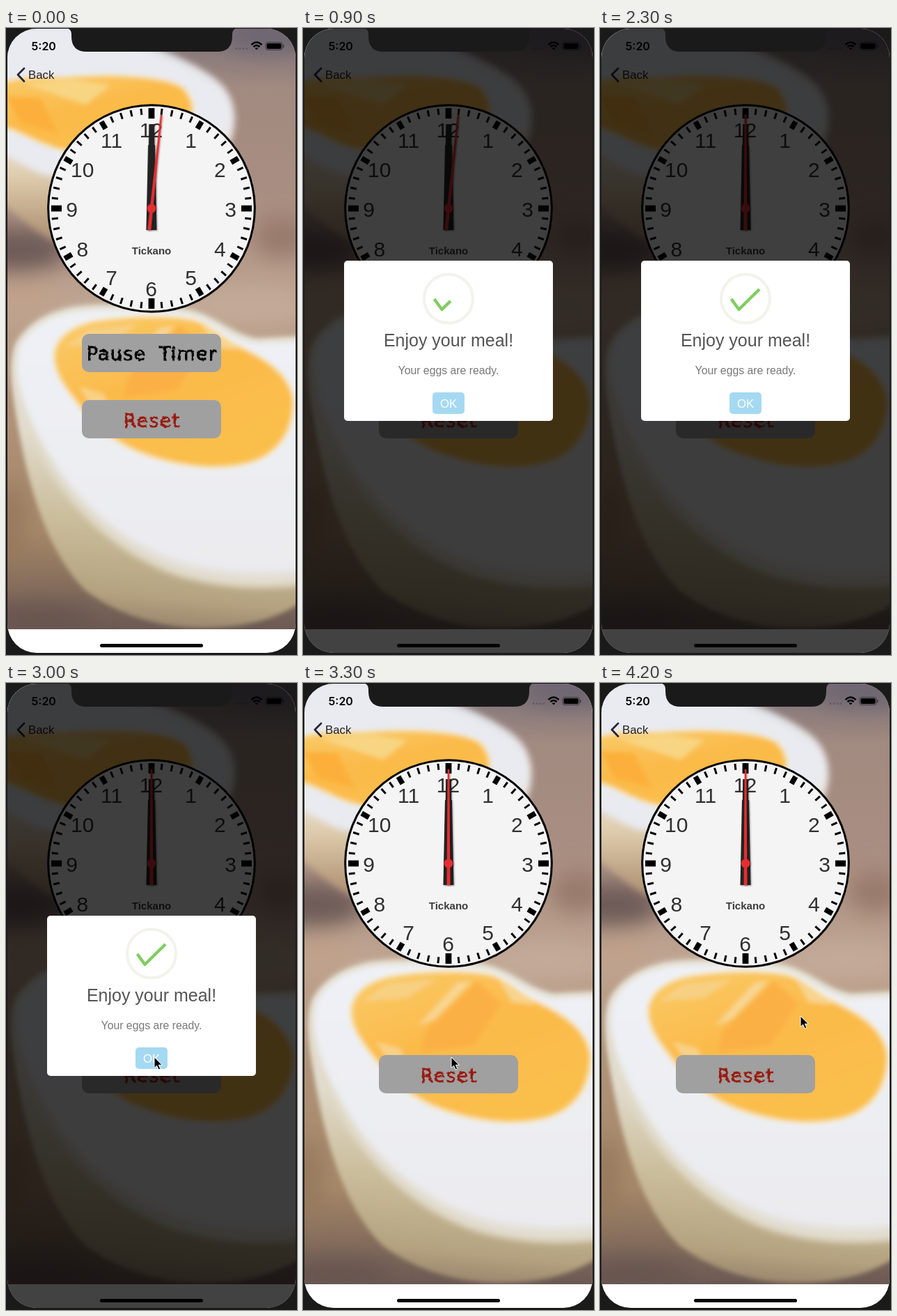
Recreate the animation shown at these times as an HTML page. Size 418 px wide and 900 px high, loop 4.3 s.

```html
<!DOCTYPE html>
<html lang="en">
<head>
<meta charset="utf-8">
<title>Egg timer</title>
<style>
  html, body { margin: 0; width: 100%; height: 100%; overflow: hidden; background: #1b1a1b; }
  svg { display: block; width: 418px; height: 900px; }
  text { font-family: "Liberation Sans", Arial, sans-serif; }
  .mid { text-anchor: middle; }
  .chalk { font: 27px "DejaVu Sans", sans-serif; letter-spacing: 1.2px; word-spacing: 9px; stroke-width: .8; filter: url(#rough); }
</style>
</head>
<body>
<svg viewBox="0 0 418 900">
  <defs>
    <clipPath id="screen"><rect x="2" y="1" width="414" height="896" rx="42"/></clipPath>
    <clipPath id="photoBox"><rect width="418" height="863"/></clipPath>
    <filter id="b3" x="-20%" y="-20%" width="140%" height="140%"><feGaussianBlur stdDeviation="3"/></filter>
    <filter id="b5" x="-30%" y="-30%" width="160%" height="160%"><feGaussianBlur stdDeviation="5"/></filter>
    <filter id="b16" x="-60%" y="-60%" width="220%" height="220%"><feGaussianBlur stdDeviation="16"/></filter>
    <filter id="rough">
      <feTurbulence type="fractalNoise" baseFrequency=".22" numOctaves="2" seed="4"/>
      <feDisplacementMap in="SourceGraphic" scale="3.5" xChannelSelector="R" yChannelSelector="G"/>
    </filter>
    <filter id="drop" x="-100%" y="-20%" width="300%" height="140%">
      <feDropShadow dx="1" dy="1" stdDeviation="1" flood-opacity=".4"/>
    </filter>
    <linearGradient id="wood" x1="0" y1="0" x2="0" y2="1">
      <stop offset="0" stop-color="#7b7078"/>
      <stop offset=".1" stop-color="#a18a80"/>
      <stop offset=".3" stop-color="#aa8f82"/>
      <stop offset=".46" stop-color="#bfa491"/>
      <stop offset=".6" stop-color="#b0947c"/>
      <stop offset=".84" stop-color="#a58768"/>
      <stop offset="1" stop-color="#6b5953"/>
    </linearGradient>
    <linearGradient id="topEgg" x1="0" y1="0" x2="0" y2="1">
      <stop offset="0" stop-color="#dcdee7"/>
      <stop offset=".5" stop-color="#eceae8"/>
      <stop offset=".7" stop-color="#dfccae"/>
      <stop offset="1" stop-color="#a98a6b"/>
    </linearGradient>
    <linearGradient id="side" x1=".3" y1=".4" x2=".25" y2="1">
      <stop offset="0" stop-color="#e2dccd"/>
      <stop offset=".45" stop-color="#cabd9b"/>
      <stop offset=".8" stop-color="#b5a380"/>
      <stop offset="1" stop-color="#937e69"/>
    </linearGradient>
    <linearGradient id="white" x1="0" y1="0" x2="0" y2="1">
      <stop offset="0" stop-color="#eff1f6"/>
      <stop offset="1" stop-color="#ebebef"/>
    </linearGradient>
    <linearGradient id="yolk" x1="0" y1="0" x2=".6" y2="1">
      <stop offset="0" stop-color="#f9cb68"/>
      <stop offset=".5" stop-color="#fbba4a"/>
      <stop offset="1" stop-color="#fabf4c"/>
    </linearGradient>
  </defs>

  <rect width="418" height="900" fill="#1b1a1b"/>
  <g clip-path="url(#screen)">
    <rect width="418" height="900" fill="#fff"/>
    <g clip-path="url(#photoBox)">
      <rect width="418" height="863" fill="url(#wood)"/>
      <g filter="url(#b16)">
        <ellipse cx="15" cy="318" rx="75" ry="34" fill="#6e5b59"/>
        <ellipse cx="380" cy="12" rx="70" ry="22" fill="#6c6570"/>
        <ellipse cx="395" cy="300" rx="40" ry="30" fill="#97796c"/>
        <ellipse cx="350" cy="400" rx="80" ry="24" fill="#c4ab99"/>
        <ellipse cx="30" cy="385" rx="45" ry="22" fill="#bfa18a"/>
        <ellipse cx="50" cy="850" rx="80" ry="22" fill="#685550"/>
        <ellipse cx="8" cy="710" rx="16" ry="60" fill="#93765a"/>
      </g>
      <g filter="url(#b5)">
        <path d="M-20-20H90C170 12 250 36 294 68C340 98 336 150 305 200C250 270 150 330 70 306C40 292 15 262-20 246Z" fill="url(#topEgg)"/>
        <path d="M-20 0H100C180 28 255 48 302 86C335 115 325 150 280 175L60 212C30 202 10 186-20 172Z" fill="#e9ebf1"/>
      </g>
      <g filter="url(#b3)">
        <path id="topYolk" d="M-10 80C30 66 60 74 100 70C160 66 230 70 254 86C280 112 268 150 230 165C170 182 100 184 62 169C35 160 20 147-10 140Z" fill="url(#yolk)" stroke="#f7dca0" stroke-width="4"/>
        <path d="M25 80L95 74L150 82L115 110Z" fill="#f8d582"/>
        <path d="M0 98L50 100L75 152L20 136Z" fill="#fcb03a"/>
      </g>
      <path filter="url(#b3)" d="M85 407C110 398 220 399 260 407C300 416 320 440 360 449L430 445V820C390 850 340 861 280 861C215 861 155 838 115 808C72 766 46 700 28 625C12 550 2 490 16 455C30 428 60 414 85 407Z" fill="url(#side)"/>
      <path filter="url(#b5)" d="M85 409C110 400 222 401 260 409C300 418 320 445 360 452L440 448V792C360 804 290 796 235 776C165 748 98 690 58 618C25 560 5 495 20 455C35 430 60 415 85 409Z" fill="#e4e0d8" stroke="#e0dac9" stroke-width="12"/>
      <path filter="url(#b5)" d="M85 410C110 400 222 402 260 410C300 419 320 446 360 452L440 448V776C360 786 290 780 240 762C165 734 100 680 58 605C25 550 6 492 20 455C35 430 60 415 85 410Z" fill="url(#white)"/>
      <g filter="url(#b3)">
        <path d="M70 464C76 438 105 422 150 418C195 413 250 413 275 421C296 430 305 442 330 455C372 474 408 496 413 535C413 580 390 612 350 624C300 637 245 628 200 612C150 594 118 560 100 535C82 512 66 490 70 464Z" fill="url(#yolk)" stroke="#f8dfa8" stroke-width="4"/>
        <path d="M165 492L222 430L242 428L190 482Z" fill="#f8d591"/>
        <path d="M85 457L120 432L190 425L150 452Z" fill="#f8d083"/>
        <path d="M175 500L250 427L285 460L245 520L170 530Z" fill="#fbb044"/>
        <path d="M280 424L300 436L335 462L300 458Z" fill="#f8d48e"/>
        <path d="M105 515L140 525L160 575L130 555Z" fill="#f9d286"/>
      </g>
    </g>

    <path d="M17 67L26 58M17 67L26 76.500" stroke="#26263c" stroke-width="2.800" stroke-linecap="round"/>
    <text x="32" y="73" font-size="16.800" fill="#20202f">Back</text>
    <text x="36.500" y="31.500" style="font:600 16px Inter,sans-serif">5:20</text>
    <g fill="#625c66">
      <circle cx="331" cy="29.500" r="1.500"/><circle cx="336" cy="29.500" r="1.500"/>
      <circle cx="341" cy="29.500" r="1.500"/><circle cx="346" cy="29.500" r="1.500"/>
    </g>
    <g fill="none" stroke="#000" stroke-width="2.400">
      <path d="M352.500 24Q360 17 367.500 24M355.500 27Q360 23 364.500 27"/>
      <path d="M358 29L360 31L362 29Z" fill="#000" stroke-width="1"/>
    </g>
    <rect x="373" y="20.500" width="24" height="11" rx="3" fill="none" stroke="#3a363c"/>
    <rect x="374.500" y="22" width="21" height="8" rx="1.800"/>
    <path d="M398.500 24V28" stroke="#3a363c" stroke-width="1.500"/>

    <g id="clock" transform="translate(209 259)">
      <circle r="148.300" fill="#f4f4f4" stroke="#000" stroke-width="3"/>
      <g id="dial"></g>
      <text class="mid" y="66" font-size="15" font-weight="700" fill="#3b3b3b">Tickano</text>
      <g id="hands" fill="#222" filter="url(#drop)">
        <path d="M-5-91H5L7.500 31H-7.500Z"/>
        <path d="M-3.800-121H3.800L6 31H-6Z"/>
      </g>
      <g id="second" fill="#e32d31" filter="url(#drop)">
        <path d="M-1.300-135H1.300L2.500 31H-2.500Z"/>
        <circle r="6.500"/>
      </g>
    </g>

    <g id="pause">
      <rect x="109" y="439" width="200" height="55" rx="10" fill="#a0a0a0"/>
      <text class="mid chalk" x="209.500" y="477" stroke="#000">Pause Timer</text>
    </g>
    <rect x="109" y="534" width="200" height="55" rx="10" fill="#a0a0a0"/>
    <text class="mid chalk" x="209.500" y="573" fill="#9a1a0c" stroke="#9a1a0c">Reset</text>
    <rect x="135" y="884" width="148" height="5" rx="2.500"/>

    <path id="shade" fill-rule="evenodd"/>
    <g id="modal">
      <rect x="59" y="334" width="300" height="230" rx="5" fill="#fff"/>
      <circle cx="209" cy="388.500" r="35" fill="none" stroke="#f3f2ec" stroke-width="4"/>
      <path id="check" d="M188.500 389L199.500 404L229 375" pathLength="1" stroke-dasharray="1 2" fill="none" stroke="#7fcd62" stroke-width="4.500" stroke-linejoin="round"/>
      <text class="mid" x="209" y="457" font-size="25" fill="#545454">Enjoy your meal!</text>
      <text class="mid" x="209" y="497" font-size="15.800" fill="#797979">Your eggs are ready.</text>
      <rect x="186" y="523" width="46" height="31" rx="5" fill="#a5d9f2"/>
      <text class="mid" x="209" y="545" font-size="16.800" fill="#fff">OK</text>
    </g>
    <path d="M86 0Q94 1 94 9V12Q94 34 116 34H303Q325 34 325 12V9Q325 1 333 0Z" fill="#1b1a1b"/>
  </g>
  <path id="cursor" d="M0 0V15.500L3.600 12.200L6.200 18L8.800 16.800L6.300 11.300H11.300Z" stroke="#fff" stroke-width="1"/>
</svg>
<script>
const LOOP = 4300, STEP = 100;
const OPEN = 345, TICK = 1000, CLOSE = 3120;
const SCREEN = 'M0 0H418V900H0Z';
const HOLE = 'M64 334H354Q359 334 359 339V559Q359 564 354 564H64Q59 564 59 559V339Q59 334 64 334Z';
const POP = [[0, .7], [135, 1.05], [240, .95], [300, 1]];
const POINTER = [[2500, 268, 585], [2800, 213, 537], [3600, 213, 537], [4100, 288, 478]];

const el = id => document.getElementById(id);
const clamp = v => Math.max(0, Math.min(1, v));
const easeOut = p => 1 - (1 - p) ** 2;

// Eased value from a table of [time, value, ...] rows.
function track(rows, t, col = 1) {
  let v = rows[0][col];
  for (let i = 1; i < rows.length; i++) {
    const [a, b] = [rows[i - 1], rows[i]];
    if (t > a[0]) v = a[col] + (b[col] - a[col]) * easeOut(clamp((t - a[0]) / (b[0] - a[0])));
  }
  return v;
}

function buildDial() {
  let out = '';
  for (let i = 0; i < 60; i++) {
    const [w, h] = i % 15 === 0 ? [8.8, 15] : i % 5 === 0 ? [7.5, 12] : [3, 9];
    out += `<rect x="${-w / 2}" y="-144" width="${w}" height="${h}" transform="rotate(${i * 6})"/>`;
  }
  for (let n = 1; n <= 12; n++) {
    const a = n * Math.PI / 6;
    out += `<text class="mid" x="${114 * Math.sin(a) - .5}" y="${11.5 - 114 * Math.cos(a)}" font-size="30" fill="#303030">${n}</text>`;
  }
  el('dial').innerHTML = out;
}

function draw(t) {
  const left = t < TICK ? 1 : 0;
  el('second').setAttribute('transform', `rotate(${left * 6})`);
  el('hands').setAttribute('transform', `rotate(${left * .1})`);
  el('pause').style.display = left ? '' : 'none';

  const shown = clamp((t - OPEN) / 100);
  const gone = clamp((t - CLOSE) / 170);
  el('shade').setAttribute('d', SCREEN + (gone ? HOLE : ''));
  el('shade').setAttribute('opacity', .74 * shown * (1 - gone));
  const s = track(POP, t - OPEN);
  el('modal').setAttribute('opacity', shown * (1 - gone));
  el('modal').setAttribute('transform', `translate(209 449) scale(${s}) translate(-209 -449)`);
  const drawn = clamp((t - 750) / 250);
  el('check').setAttribute('stroke-dashoffset', 1 - drawn);
  el('check').style.visibility = drawn ? 'visible' : 'hidden';

  el('cursor').style.display = t < POINTER[0][0] ? 'none' : '';
  el('cursor').setAttribute('transform', `translate(${track(POINTER, t)} ${track(POINTER, t, 2)})`);
}

buildDial();
const start = performance.now();
function loop() {
  const t = (performance.now() - start) % LOOP;
  draw(Math.floor(t / STEP) * STEP);
  requestAnimationFrame(loop);
}
loop();
</script>
</body>
</html>
```
